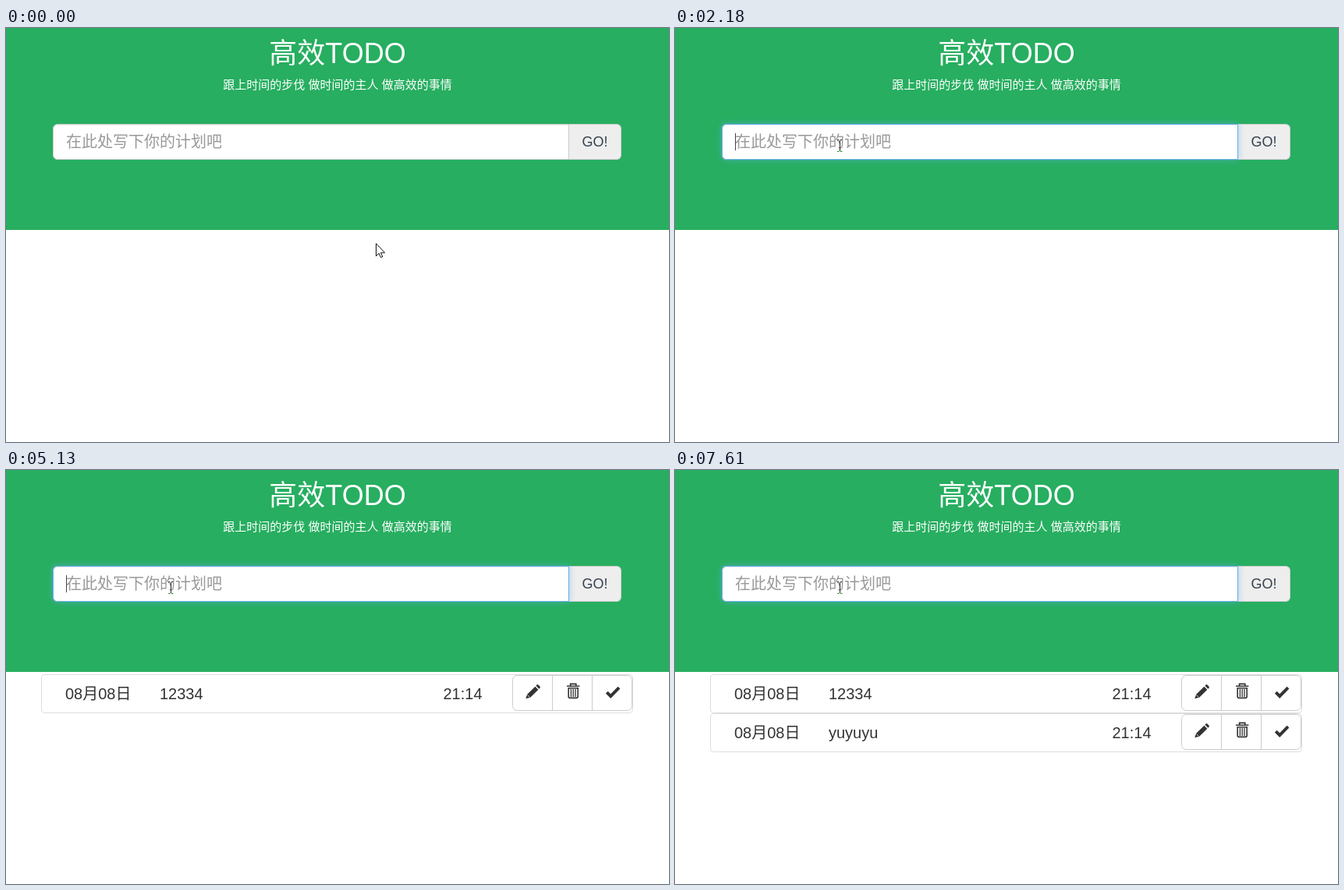
An HTML page for the animation above (8000 ms loop, 850 by 531 pixels).

```html
<!DOCTYPE html>
<html lang="zh-CN">
<head>
<meta charset="utf-8">
<title>高效TODO</title>
<style>
  html, body { margin: 0; width: 100%; height: 100%; overflow: hidden; background: #fff; }
  header { position: absolute; width: 850px; height: 259px; background: #27ae60; }
  header div { position: absolute; box-sizing: border-box; top: 123px; height: 46px; border: 1px solid #ccc; }
  .field { left: 60px; width: 662px; border-radius: 6px 0 0 6px; background: #fff;
    box-shadow: inset 0 1px 1px rgba(0,0,0,.075); }
  #focus { border-color: #66afe9;
    box-shadow: inset 0 1px 1px rgba(0,0,0,.075), 0 0 8px rgba(102,175,233,.6); }
  .go { left: 722px; width: 67px; border-left: 0 !important; border-radius: 0 6px 6px 0; background: #eee; }
  svg { position: absolute; left: 0; top: 0; }
  text { font: 20px "Liberation Sans", "Noto Sans CJK SC", "Noto Sans CJK", sans-serif; white-space: pre; }
  .row text, .icon { fill: #333; }
  .box { fill: #fff; stroke: #ddd; }
  .buttons { fill: #fff; stroke: #ccc; }
</style>
</head>
<body>
<header>
  <div class="go"></div>
  <div class="field"></div>
  <div class="field" id="focus"></div>
</header>
<svg width="850" height="531">
  <defs>
    <g id="tools">
      <path class="buttons" d="M655.5 263.5H796.5a6 6 0 0 1 6 6V302.5a6 6 0 0 1-6 6H655.5a6 6 0 0 1-6-6V269.5a6 6 0 0 1 6-6ZM700.5 264V308M751.5 264V308"/>
      <path class="icon" d="M666.3 293.3l1.9-5.6 10.2-10 4 4-10.2 10ZM679.4 276.7l1.2-1.2q.9-.8 1.8 0l2.2 2.2q.8.9 0 1.8l-1.2 1.2Z"/>
      <path d="M668.6 288.6l2.8 2.8" stroke="#fff" stroke-width=".8"/>
      <g fill="none" stroke="#333" stroke-width="1.6">
        <path d="M719 277.2H735.4M723.6 277V274.4H730.8V277M721.2 279.8H733.2V290.6q0 1.8-1.8 1.8H723q-1.8 0-1.8-1.8Z"/>
        <path stroke-width="1.3" d="M724.4 281V291M727.2 281V291M730 281V291"/>
      </g>
      <path d="M770.3 285.2l4.9 4.9L786 279.2" fill="none" stroke="#333" stroke-width="4"/>
    </g>
  </defs>
  <g fill="#fff" text-anchor="middle">
    <text x="425" y="45" style="font-size:36px">高效TODO</text>
    <text x="425" y="78" style="font-size:15px">跟上时间的步伐 做时间的主人 做高效的事情</text>
  </g>
  <text x="738.5" y="152" fill="#34404c" style="font-size:18px">GO!</text>
  <text id="hint" x="77" y="153" fill="#999">在此处写下你的计划吧</text>
  <text id="typed" x="77" y="153" fill="#555"></text>
  <rect id="caret" y="135" width="1" height="22" fill="#444"/>
  <g id="rows"></g>
  <path id="arrow" d="M.5.5V16.5L4.2 13 6.5 18.3 8.8 17.4 6.5 12.2H11.6Z" fill="#fff" stroke="#111"/>
  <g id="beam" fill="none">
    <path d="M-3-7.5H-1M1-7.5H3M0.5-7V7" stroke="#222"/>
    <path d="M-3 7.5H-.5M1 7.5H3.5" stroke="#2b9a3a"/>
  </g>
</svg>
<script>
const LOOP = 8000, FOCUS = 1100;
const $ = id => document.getElementById(id);

// [time, text in the field, caret shown]
const typing = [
  [0, '', 0], [FOCUS, '', 1], [1630, '', 0], [2180, '', 1],
  [2560, '1', 1], [2870, '12', 1], [3100, '123', 1], [3330, '1233', 1], [3560, '12334', 1],
  [4110, '', 1], [4580, '', 0], [5130, '', 1],
  [5590, 'y', 1], [5670, 'yu', 1], [5970, 'yuy', 1], [6140, 'yuyu', 1],
  [6370, 'yuyuy', 1], [6450, 'yuyuyu', 1], [7000, 'yuyuyu', 0],
  [7070, '', 1], [7610, '', 0]
];

// [time, x, y] of the pointer
const pointer = [
  [0, 474, 276], [70, 452, 258], [140, 340, 176], [210, 180, 74], [270, 82, 18],
  [340, 43, 0], [400, 98, 42], [460, 177, 107], [540, 204, 145],
  [690, 206, 146], [760, 208, 148], [840, 210, 150], [920, 211, 151]
];

const items = [[4110, '12334'], [7070, 'yuyuyu']];

$('rows').innerHTML = items.map(([, label], i) => `
  <g class="row" transform="translate(0 ${i * 50})">
    <rect class="box" x="45.5" y="262.5" width="758" height="49" rx="4"/>
    <text x="76" y="294">08月08日</text>
    <text x="197" y="294">${label}</text>
    <text x="560.5" y="294">21:14</text>
    <use href="#tools"/>
  </g>`).join('');
const rows = [...$('rows').children];

const current = (steps, t) => steps.findLast(step => step[0] <= t);
const show = (el, on) => { el.style.display = on ? '' : 'none'; };

function draw(t) {
  const [, text, caretOn] = current(typing, t);
  $('typed').textContent = text;
  show($('hint'), !text);
  show($('caret'), caretOn);
  $('caret').setAttribute('x', Math.round(77 + (text ? $('typed').getComputedTextLength() : 0)));
  $('focus').style.opacity = Math.min(1, Math.max(0, (t - FOCUS) / 150));

  rows.forEach((row, i) => show(row, t >= items[i][0]));

  const [, x, y] = current(pointer, t);
  const overField = t >= 540;
  show($('arrow'), !overField);
  show($('beam'), overField);
  $(overField ? 'beam' : 'arrow').setAttribute('transform', `translate(${x} ${y})`);
}

const start = performance.now();
function tick() {
  draw((performance.now() - start) % LOOP);
  requestAnimationFrame(tick);
}
tick();
</script>
</body>
</html>
```
